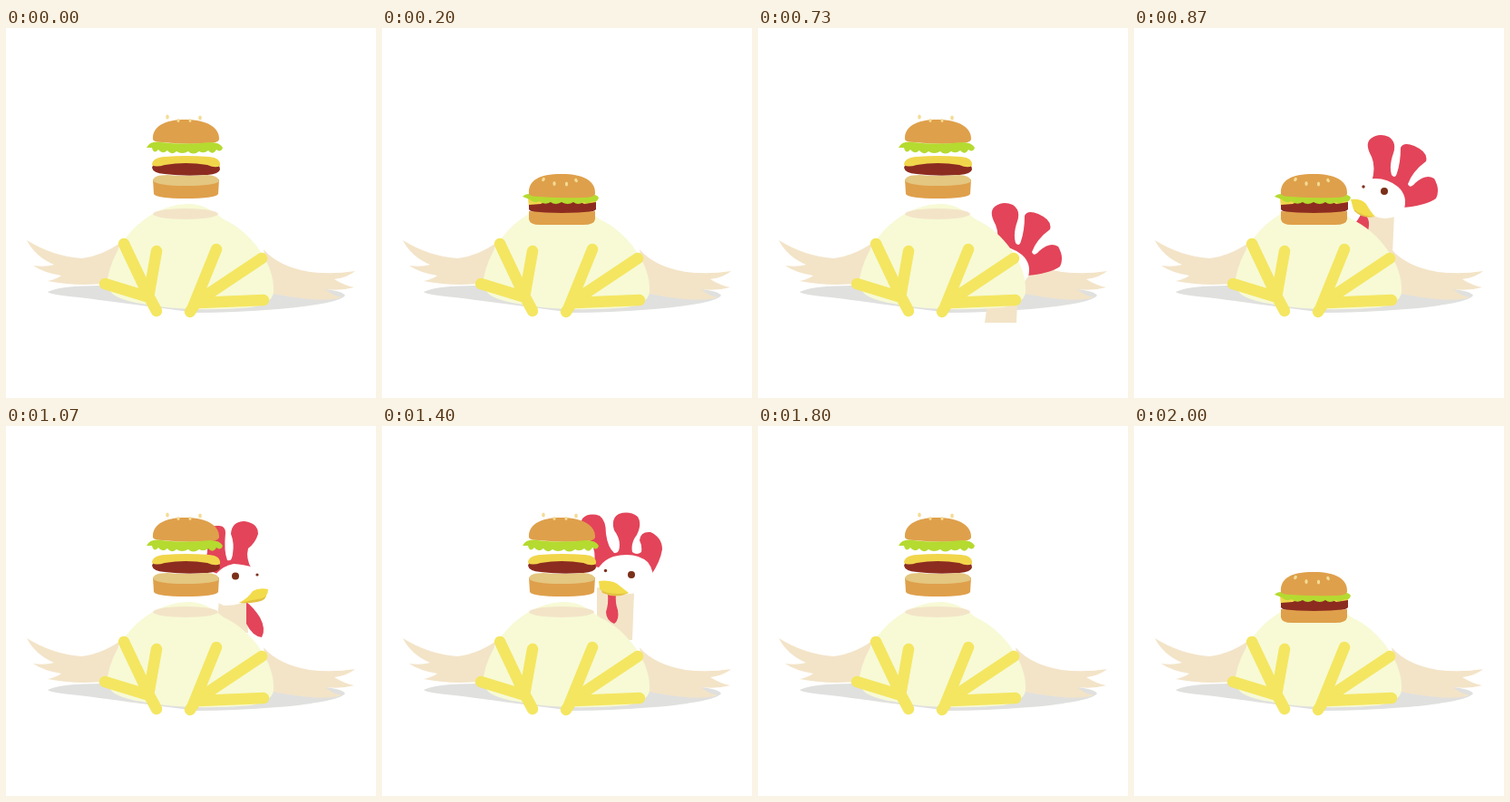
Write an HTML page that moves like this. It is 408 px wide and 408 px high and loops after 2140 ms.

```html
<!DOCTYPE html>
<html lang="en">
<head>
<meta charset="utf-8">
<title>Burger hen</title>
<style>
html, body { margin: 0; width: 100%; height: 100%; overflow: hidden; background: #fff; }
svg { display: block; width: 100%; height: 100%; }
.shade { fill: #e0e0df; }
.wing, .neck { fill: #f3e4c8; }
.egg { fill: #f7fad5; }
.foot { fill: none; stroke: #f4e661; stroke-width: 12.5; stroke-linecap: round; stroke-linejoin: round; }
.red { fill: #e34459; }
.white { fill: #fff; }
.eye { fill: #7b3019; }
.beak { fill: #f2dc4b; }
.under { fill: #e3c243; }
.bun { fill: #dfa04b; }
.crumb { fill: #e4c780; }
.leaf { fill: #b5da30; }
.cheese { fill: #f1d64c; }
.meat { fill: #8c2c20; }
.seed { fill: #f4dc95; }
</style>
</head>
<body>
<svg viewBox="0 0 408 408">
  <path class="shade" d="M46 291Q60 283 120 284L300 285Q370 286 374 295Q368 304 300 310Q250 314 210 314Q120 302 80 297Q48 294 46 291Z"/>
  <path class="wing" d="M23 234Q52 252 84 254Q106 251 126 237L113 281Q82 286 46 279Q55 277 61 273Q42 270 30 262Q43 264 53 261Q32 252 23 234Z"/>
  <path class="wing" d="M284 244Q300 263 335 269Q360 272 385 268Q377 275 362 277Q373 284 384 286Q370 290 352 288Q360 295 370 297Q350 304 294 293Z"/>

  <g id="left">
    <path class="neck" d="M257 200L287 204L285 250H250Z"/>
    <path class="red" d="M251 204Q262 208 258 224Q251 224 243 216Q247 212 251 204Z"/>
    <path class="red" d="M262 170Q267 154 262 142Q254 128 261 122Q270 115 281 120Q290 126 286 138Q281 152 284 162Q288 167 290 160Q294 148 294 132Q297 125 309 130Q325 137 322 147Q307 158 302 172Q304 178 310 171Q322 160 331 166Q338 178 333 188Q321 196 296 198Z"/>
    <path class="white" d="M240 188Q239 169 257 167Q276 163 291 175Q302 185 298 199Q292 210 277 210Q257 209 240 188Z"/>
    <path class="under" d="M242 196L265 208Q253 211 243 202Z"/>
    <path class="beak" d="M239 189Q251 188 256 194Q261 203 266 208Q250 207 242 200Z"/>
    <circle class="eye" cx="276" cy="180" r="4"/>
    <circle class="eye" cx="253" cy="175" r="1.7"/>
  </g>

  <g id="right">
    <path class="neck" d="M235 190H265L267 228H232Z"/>
    <path class="red" d="M265 194Q273 200 280 211Q287 224 282 233Q272 232 265 218Z"/>
    <path class="red" d="M216 156Q226 139 220 120Q221 110 233 110Q242 109 242 118Q240 138 244 148Q249 150 250 141Q252 129 248 119Q249 105 263 105Q278 107 278 119Q275 129 267 135Q264 146 271 158L250 170Z"/>
    <path class="white" d="M226 180Q228 157 251 152Q274 153 284 164Q287 174 279 184Q265 198 240 198Q228 194 226 180Z"/>
    <path class="under" d="M257 195L287 185Q288 192 277 194Q267 196 257 195Z"/>
    <path class="beak" d="M257 195Q268 189 272 182Q279 178 289 180Q289 188 282 190Z"/>
    <circle class="eye" cx="253" cy="165.500" r="4"/>
    <circle class="eye" cx="277" cy="164" r="1.600"/>
  </g>

  <g id="front">
    <path class="neck" d="M237 178L278 184L276 236H237Z"/>
    <path class="red" d="M249 185H258Q257 195 260 203Q262 214 256 218Q247 214 247 205Q250 196 249 185Z"/>
    <path class="red" d="M233 155Q238 137 227 123Q216 111 221 102Q228 95 240 99Q247 104 247 119Q249 134 256 140Q262 141 262 131Q262 123 256 115Q252 102 261 97Q273 93 282 100Q287 108 281 120Q274 129 276 139Q281 143 286 139Q287 132 284 126Q285 116 296 117Q309 123 309 136Q307 149 297 164Z"/>
    <path class="white" d="M235 173Q235 151 255 144Q279 138 293 150Q301 160 298 173Q291 185 273 185Q249 187 235 173Z"/>
    <path class="under" d="M240 176L272 184Q258 191 243 184Z"/>
    <path class="beak" d="M239 171Q255 169 263 177L272 184Q250 187 240 180Z"/>
    <circle class="eye" cx="275" cy="164" r="4"/>
    <circle class="eye" cx="246.500" cy="159.500" r="1.700"/>
  </g>

  <path class="egg" d="M112 276Q116 255 129 236C145 212 172 194 203 194C222 195 232 205 240 211C270 224 298 262 295 292Q293 304 270 308Q200 314 150 304Q117 299 113 287Z"/>
  <ellipse class="neck" cx="198" cy="205" rx="36" ry="6"/>
  <path class="foot" d="M130 238L158 297L166 312M166 246L157 297M109 282L158 297M232 244L206 308M282 254L210 302L203 313M284 300L212 303"/>

  <g id="open">
    <path class="bun" d="M162 123C161 109 174 101 198 101C223 101 236 111 235 123Q234 127 222 127Q198 129 173 126Q163 126 162 123Z"/>
    <path class="leaf" d="M155 132Q159 124 171 126Q198 129 225 126Q236 126 239 132Q237 138 232 134Q228 141 223 135Q218 139 213 136Q206 141 201 136Q194 140 188 136Q182 141 178 135Q172 140 168 134Q163 140 161 132Z"/>
    <path class="meat" d="M161 154Q162 148 172 148H226Q236 149 236 156Q235 161 222 162Q198 164 175 161Q162 160 161 154Z"/>
    <path class="cheese" d="M161 151Q161 143 175 142Q198 140 224 142Q237 143 236 152Q231 155 222 151Q198 147 175 151Q165 154 161 151Z"/>
    <path class="bun" d="M162 167H235L234 183Q231 188 198 188Q166 188 163 183Z"/>
    <path class="crumb" d="M162 168Q163 162 178 162Q198 164 222 162Q235 163 235 169Q230 174 198 174Q166 174 162 168Z"/>
    <g class="seed">
      <ellipse cx="178" cy="98" rx="1.800" ry="2.500"/>
      <ellipse cx="190" cy="102" rx="1.500" ry="2"/>
      <ellipse cx="203" cy="102" rx="1.500" ry="2"/>
      <ellipse cx="214" cy="99" rx="1.800" ry="2.500"/>
    </g>
  </g>

  <g id="shut">
    <path class="cheese" d="M161 188H236V198Q198 202 162 197Z"/>
    <path class="meat" d="M162 195L175 194L181 191H217L223 194L236 192V200Q232 205 198 205Q165 205 162 200Z"/>
    <path class="bun" d="M162 202Q198 206 235 202V211Q234 217 222 217H174Q163 217 162 211Z"/>
    <path class="leaf" d="M155 186Q159 181 169 184Q198 188 227 184Q236 182 239 187Q237 193 232 191Q227 195 222 192Q216 196 211 192Q205 196 198 192Q191 196 186 192Q179 196 174 191Q167 194 163 189Z"/>
    <path class="bun" d="M162 183C161 168 173 161 198 161C223 161 236 169 235 183Q234 187 222 187Q198 188 173 186Q163 186 162 183Z"/>
    <g class="seed">
      <ellipse cx="178" cy="167" rx="1.700" ry="2.300" transform="rotate(30 178 167)"/>
      <ellipse cx="190" cy="171.500" rx="1.600" ry="2.500"/>
      <ellipse cx="203.500" cy="172" rx="1.600" ry="2.500"/>
      <ellipse cx="214" cy="168" rx="1.700" ry="2.300" transform="rotate(-30 214 168)"/>
    </g>
  </g>
</svg>
<script>
const LOOP = 2140;
// start ms, burger, head pose, head x, head y
const steps = [
  [0, "open"],
  [200, "shut"],
  [330, "open"],
  [530, "shut"],
  [730, "open", "left", 0, 75],
  [800, "open", "left", 0, 30],
  [870, "shut", "left", 0, 0],
  [1070, "open", "right", 0, 0],
  [1270, "shut", "right", 5, 6],
  [1400, "open", "front", 0, 0],
  [1600, "shut", "front", 0, 57],
  [1800, "open"],
  [2000, "shut"]
];
const part = {};
for (const id of ["open", "shut", "left", "right", "front"]) part[id] = document.getElementById(id);

function draw(ms) {
  const t = ms % LOOP;
  const [, burger, pose, x, y] = steps.findLast(s => s[0] <= t);
  for (const id in part) {
    part[id].style.display = id === burger || id === pose ? "" : "none";
  }
  if (pose) part[pose].setAttribute("transform", `translate(${x} ${y})`);
}

const start = performance.now();
function tick() {
  draw(performance.now() - start);
  requestAnimationFrame(tick);
}
tick();
</script>
</body>
</html>
```
